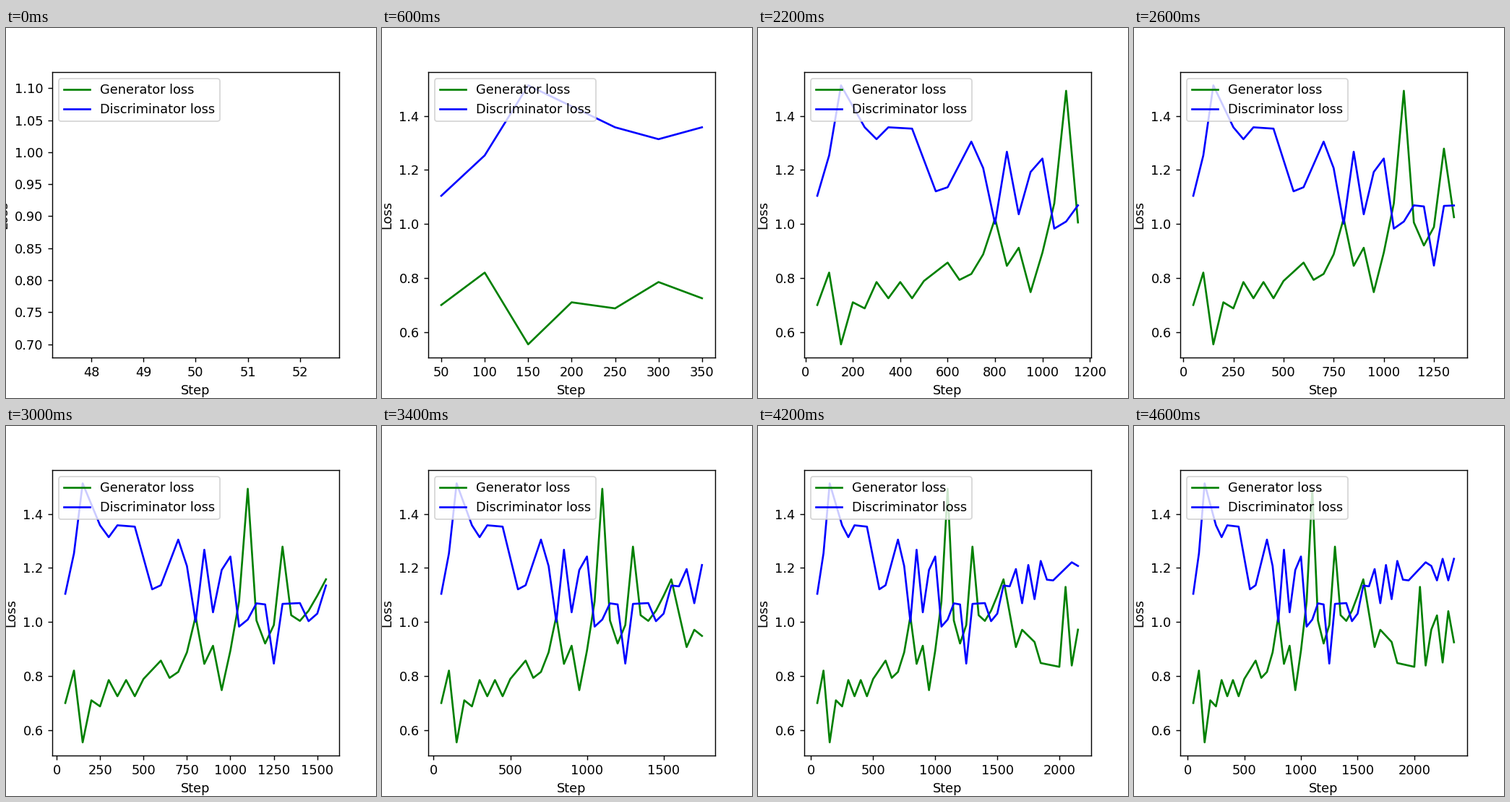
A matplotlib script that plays this animation: 512x512 px, repeating every 4700 ms.

```python
import matplotlib.pyplot as plt
import numpy as np
from matplotlib.animation import FuncAnimation

DPI = 128
SIZE = 512
STRIDE = 50  # training steps between samples
N = np.arange(1, 48)
STEPS = STRIDE * N


def trend(*keys):
    """Straight runs between a few (sample, loss) key points."""
    return np.interp(N, *zip(*keys))


def wave(first, last, peak, amp, period=2, fade=0):
    """Oscillation limited to samples first..last."""
    swing = amp * np.cos(2 * np.pi * (N - peak) / period)
    swing *= np.exp(-fade * (N - first))
    return np.where((N >= first) & (N <= last), swing, 0)


def spike(peak, height):
    """Sharp peak that falls to 30% with each sample."""
    return height * 0.3 ** np.abs(N - peak)


gen = (
    trend((1, 0.7), (2, 0.82), (3, 0.5543), (4, 0.68), (6, 0.755),
          (9, 0.755), (12, 0.857), (13, 0.793), (14, 0.815), (16, 0.96),
          (19, 0.79), (21, 0.88), (23, 0.8), (27, 0.905), (31, 1.157),
          (33, 0.907), (34, 0.971), (36, 0.926), (37, 0.848),
          (40, 0.834), (41, 0.955))
    + wave(4, 9, peak=4, amp=0.03)
    + wave(16, 19, peak=16, amp=0.06)
    + wave(41, 47, peak=41, amp=0.175, period=2.6, fade=0.12)
    + spike(22, 0.65)
    + spike(26, 0.395)
)
disc = (
    trend((1, 1.10435), (2, 1.254), (3, 1.5133), (5, 1.358), (6, 1.314),
          (7, 1.358), (9, 1.353), (11, 1.121), (12, 1.136), (14, 1.305),
          (15, 1.207), (16, 1.11), (20, 1.18), (21, 1.11), (22, 1.009),
          (23, 1.069), (24, 1.065), (25, 0.846), (26, 1.067), (28, 1.07),
          (29, 1.003), (30, 1.031), (31, 1.135), (33, 1.129),
          (37, 1.159), (39, 1.154), (42, 1.221), (44, 1.194))
    + wave(16, 21, peak=17, amp=0.14, period=2.55)
    + wave(33, 37, peak=33, amp=0.067)
    + wave(44, 47, peak=45, amp=0.04)
)

plt.rcParams["font.family"] = "DejaVu Sans"
fig, ax = plt.subplots(figsize=(SIZE / DPI, SIZE / DPI), dpi=DPI)
gen_line, = ax.plot([], [], color="green", label="Generator loss")
disc_line, = ax.plot([], [], color="blue", label="Discriminator loss")
ax.set_xlabel("Step")
ax.set_ylabel("Loss")
ax.legend(loc="upper left")


def update(i):
    """Show the first i + 1 samples and refit the axes to them."""
    shown = slice(i + 1)
    gen_line.set_data(STEPS[shown], gen[shown])
    disc_line.set_data(STEPS[shown], disc[shown])
    ax.relim()
    ax.autoscale_view()
    return gen_line, disc_line


anim = FuncAnimation(fig, update, frames=len(N), interval=100,
                     init_func=lambda: update(0), repeat=True,
                     repeat_delay=0, blit=False)
plt.show()
```
